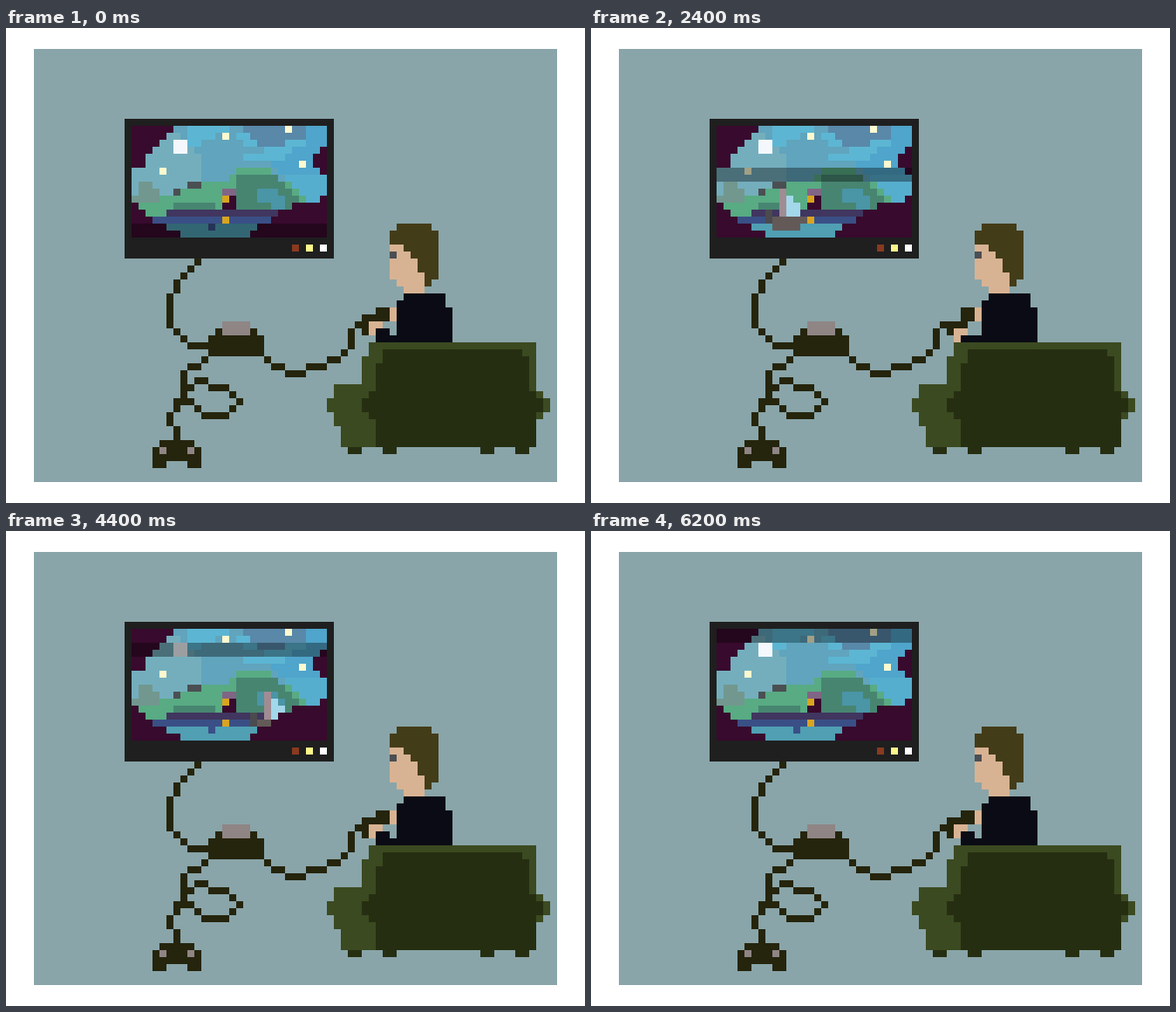
Recreate the animation shown at these times as an HTML page with a canvas. Size 664 by 544 pixels, loop 6400 ms.

```html
<!DOCTYPE html>
<html lang="en">
<head>
<meta charset="utf-8">
<title>Evening game</title>
<style>
html, body { margin: 0; width: 100%; height: 100%; overflow: hidden; background: #fff; }
canvas { display: block; }
</style>
</head>
<body>
<canvas id="stage" width="664" height="544"></canvas>
<script>
const ctx = document.getElementById('stage').getContext('2d');
const CELL = 8, STEP = 200, STEPS = 32;
const CABLE = '#25240c', SKIN = '#d8b393', COAT = '#0a0b14', GREY = '#8f8585', PLUM = '#380a2d';
ctx.scale(CELL, CELL);

const parse = text => text.split(' ').map(p => p.split(',').map(Number));

function box(color, x, y, w = 1, h = 1) {
  ctx.fillStyle = color;
  ctx.fillRect(x, y, w, h);
}

// Fills every cell whose centre lies inside the outline.
function poly(color, outline) {
  const pts = parse(outline), ys = pts.map(p => p[1]);
  for (let y = Math.floor(Math.min(...ys)); y < Math.max(...ys); y++) {
    const mid = y + 0.5, cuts = [];
    pts.forEach(([ax, ay], i) => {
      const [bx, by] = pts[(i + 1) % pts.length];
      if ((ay <= mid) !== (by <= mid)) cuts.push(ax + (bx - ax) * (mid - ay) / (by - ay));
    });
    cuts.sort((a, b) => a - b);
    for (let i = 0; i < cuts.length; i += 2) {
      const from = Math.ceil(cuts[i] - 0.5), to = Math.ceil(cuts[i + 1] - 0.5);
      box(color, from, y, to - from);
    }
  }
}

// Draws a one-cell-wide line through key points.
function cord(path) {
  const pts = parse(path);
  for (let i = 1; i < pts.length; i++) {
    const [ax, ay] = pts[i - 1], [bx, by] = pts[i];
    const n = Math.max(Math.abs(bx - ax), Math.abs(by - ay));
    for (let k = 0; k <= n; k++) {
      box(CABLE, Math.round(ax + (bx - ax) * k / n), Math.round(ay + (by - ay) * k / n));
    }
  }
}

function room() {
  box('#ffffff', 0, 0, 83, 68);
  box('#89a5a9', 4, 3, 75, 62);
  box('#1f1f1f', 17, 13, 30, 20);
  ['#8a3a20', '#fbf78b', '#ffffff'].forEach((c, i) => box(c, 41 + 2 * i, 31));
}

function devices() {
  cord('27,33 24,36 24,37 23,38 23,42 26,45 28,45');
  box(CABLE, 29, 44, 8, 3);
  box(CABLE, 30, 43, 6);
  box(GREY, 31, 42, 4, 2);

  cord('28,47 27,48 26,48 25,49 25,52 24,53 24,54 23,55 23,56 24,57 24,58');
  cord('26,51 27,50 28,50 29,51 31,51 33,53 31,55 28,55 26,53 25,53');
  box(CABLE, 22, 59, 5);
  box(CABLE, 21, 60, 7, 2);
  for (const side of [0, 1]) {
    box(CABLE, 21 + 5 * side, 62, 2);
    box(GREY, 22 + 4 * side, 60);
  }
}

function sky() {
  box('#61a4bd', 0, 0, 28, 16);
  poly('#74aebd', '0,3 5,1 6,1 9.5,4 10,8 8,10 0,10');
  poly('#5cb6d3', '8,0 14.5,0 8,3.4');
  poly('#5cb6d3', '14,1 17,1 25,2 25,3 24,5 16,5 16,4 19,4 19,3 16,2.9');
  poly('#5988a9', '15.9,0 25,0 25,2 22,2 22,3 19,3');
  poly('#4fa5cb', '25,0 28,0 28,7 21,7 20,5 24,4 23,3 25,3');
  box('#56aecf', 22, 7, 6, 4);
  for (const [x, y] of [[22, 0], [13, 1], [24, 5], [4, 6]]) box('#fdf9d0', x, y);
  box('#f4f8fc', 6, 2, 2, 2);
}

function island() {
  poly('#58ab83', '15,6 19.5,6 25,10.5 25,11 23,11 23,12 5,12 5,13 2,13 1,11 4,10 7,9.6 10,8 14,8 14,7 15,7');
  poly('#478571', '16,7 20,7 23,9.3 24,11 23,12 14,12 14,10 15,8');
  box('#478571', 6, 11, 6);
  poly('#4a95a6', '18,9 21,9 22,10 22,12 20,12 20,11 18,11');
  poly('#72978f', '1,8 2.9,8 4,9 4,11 0,11 0,10 1,10');
  box('#4a4f53', 8, 8, 2);
  box('#4a4f53', 6, 9);
  box('#806585', 13, 9, 2);
  box(PLUM, 13, 10, 2, 2);
}

function sea() {
  box('#40365f', 5, 12, 18);
  box('#3a4f86', 0, 13, 28);
  box('#509fb3', 0, 14, 28, 2);
  box('#3a4f86', 11, 14);
  for (const y of [10, 13]) box('#d9a420', 13, y);
}

function ship(mast) {
  box('#4b4a4e', mast - 2, 12, 1, 2);
  box('#635a58', mast - 1, 13, 5);
  box('#635a58', mast - 1, 14, 4);
  box('#a08c93', mast, 9, 1, 4);
  poly('#a3d7ea', `${mast + 1},10 ${mast + 2},10 ${mast + 3},11 ${mast + 3},13 ${mast + 1},13`);
}

function porthole() {
  poly(PLUM, '0,0 6.4,0 2,4.4 2,6 0,6');
  poly(PLUM, '28,3 27.2,3 26,4 26,6 27.2,7 28,7');
  poly(PLUM, '0,11 1,11 3,13.7 8,16 0,16');
  poly(PLUM, '28,10 27,10 27,11 23.5,11 16.25,16 28,16');
}

function screen(step) {
  ctx.save();
  ctx.translate(18, 14);
  ctx.beginPath();
  ctx.rect(0, 0, 28, 16);
  ctx.clip();
  sky();
  island();
  sea();
  ship(step - 3);
  porthole();
  // dark refresh band rising up the tube
  box('rgba(0,0,0,.36)', 0, 14 - 2 * (step % 8), 28, 2);
  ctx.restore();
}

function man() {
  poly('#433c18', '56,28 61,28 61,29 62,29 62,36 61,36 61,37 60,37 60,36 55,36 55,29 56,29');
  poly(SKIN, '55,31 56.9,31 59,33 59,35 60,35 60,38 57.2,38 55.2,36 55,36');
  box('#4b4e53', 55, 32);
  poly(COAT, '57,38 63,38 63,40 64,40 64,45 56,45 56,39 57,39');
}

function sofa() {
  poly('#3b4a20', '52,45 76,45 76,51.8 78.2,54 76,56.2 76,60 48,60 48,57 47,57 47,55 46,55 46,53 47,53 47,51 51,51 51,47 52,47');
  poly('#262e12', '54,46 73.9,46 75,47 75,52 76,52 76.9,53 76.9,55 76,56 76,60 53,60 53,56 51,55 51,53 53,52 53,48 54,48');
  for (const x of [49, 54, 68, 73]) box('#262e12', x, 60, 2);
}

// Each thumb press lasts two steps.
const pressed = (starts, step) => Number(starts.some(s => step === s || step === s + 1));

function hands(step) {
  const left = pressed([3, 11, 15, 29], step);
  const right = pressed([9, 15, 20, 28], step);
  const sag = left & right;
  cord('37,47 39,48 40,49 42,49 43,48 ' +
    `${45 + sag},48 ${46 + sag},47 ${47 + sag},47 49,${45 + sag} 49,${43 + sag} ` +
    `50,${42 + sag} 51,${42 + sag} 51,${43 + sag}`);
  box(CABLE, 53, 40 + right, 2, 2);
  box(CABLE, 51, 41 + left, 3);
  box(SKIN, 55, 40 + right, 1, 2);
  box(SKIN, 52, 42 + left, 2);
  box(SKIN, 52, 43 + left);
  box(COAT, 53, 43 + left, 2);
  box(COAT, 53, 44, 3);
}

let shown = -1;
function tick(now) {
  const step = Math.floor(now / STEP) % STEPS;
  if (step !== shown) {
    shown = step;
    room();
    screen(step);
    devices();
    man();
    hands(step);
    sofa();
  }
  requestAnimationFrame(tick);
}
tick(0);
</script>
</body>
</html>
```
